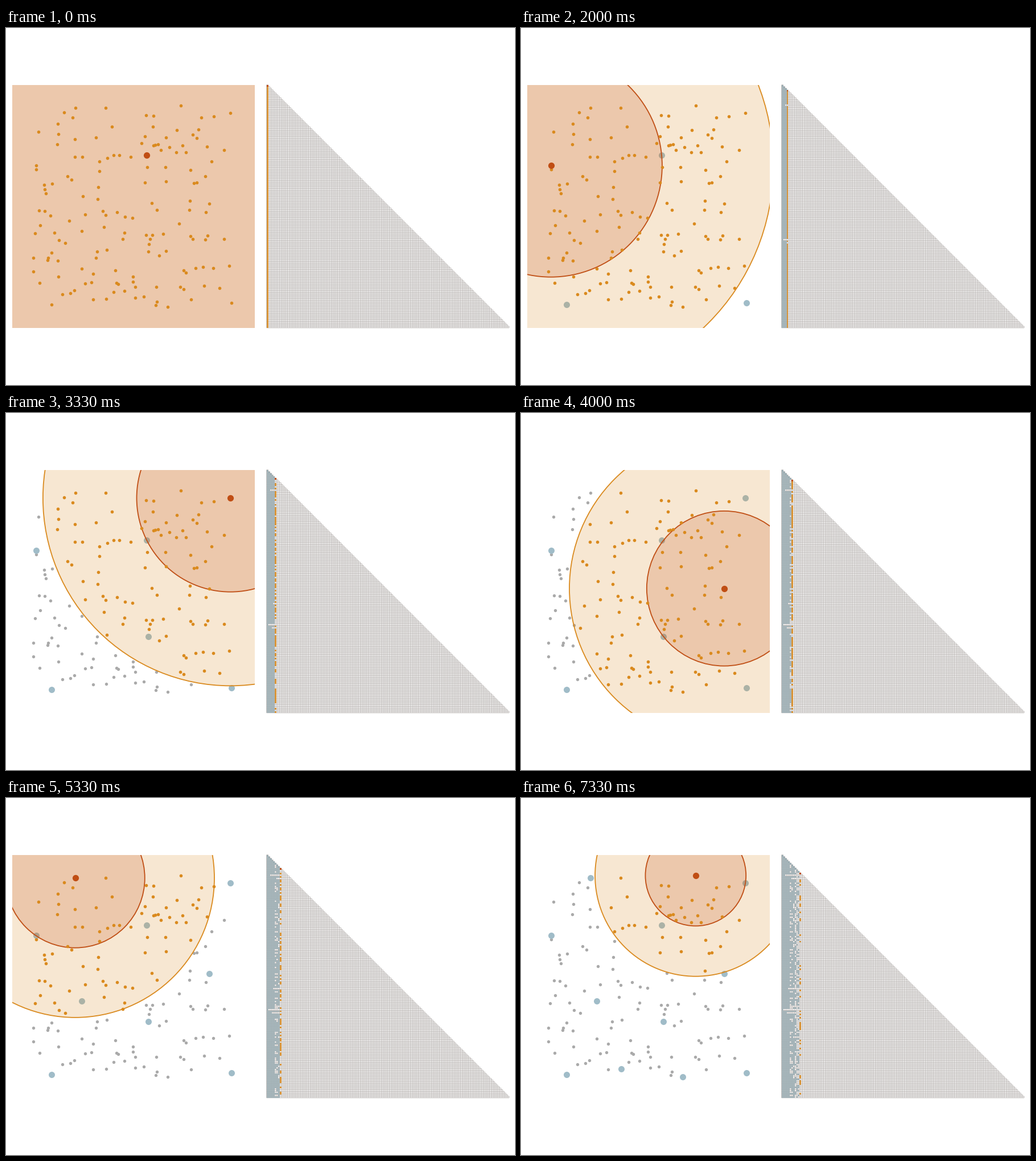
Animation of 894 by 626 pixels, one loop 8000 ms. Source, as a matplotlib script:

```python
import numpy as np
import matplotlib.pyplot as plt
from matplotlib.animation import FuncAnimation
from matplotlib.collections import LineCollection
from matplotlib.colors import to_rgba
from matplotlib.patches import Circle, Rectangle

W, H, DPI = 894, 626, 100
PX = 72 / DPI
INTERVAL, FRAMES, COUNT = 50, 160, 150
ORANGE, RED, BLUE, GREY = "#da8a1e", "#c04e14", "#a0bcc8", "#aaaaaa"
MESH, VISITED = "#aaa5a2", "#9caeb4"
SIDE, TOP, LEFT, GRID_X = 426, 99.8, 10.5, 457.7

# Centres in the order they are chosen; each is the farthest point left
HUBS = np.array([
    (247, 222.8), (80, 485.2), (395.5, 482), (52.5, 241.3), (250, 391.8),
    (394.2, 149), (356.7, 307.7), (133, 355.6), (121.5, 140.4),
    (284, 488.8), (176.2, 474.6), (306.8, 136)])
FIRST_ROWS = [0, 95, 12, 97]
STEPS = len(HUBS)
rng = np.random.default_rng(7)


def distances(points):
    """Distance of every centre (rows) to every point (columns)."""
    return np.linalg.norm(HUBS[:, None] - points, axis=2)


# Distance of each centre to the closest earlier one
apart = distances(HUBS)
radii = np.array([1000] + [apart[k, :k].min() for k in range(1, STEPS)])

# Scatter the other points where they would not be chosen any earlier
spread = rng.uniform((46, 139), (394, 490), (4 * COUNT, 2))
closest = np.minimum.accumulate(distances(spread), axis=0)
fits = (closest[:-1] <= radii[1:, None]).all(axis=0)
pts = np.vstack([HUBS, spread[fits]])[:COUNT]
index = np.arange(COUNT)
near = distances(pts) <= 2 * radii[:, None]

others = np.setdiff1d(index, FIRST_ROWS)
rows = np.concatenate([FIRST_ROWS, rng.permutation(others)])

fig = plt.figure(figsize=(W / DPI, H / DPI), dpi=DPI, facecolor="white")
ax = fig.add_axes([0, 0, 1, 1])
ax.axis("off")
panel = Rectangle((LEFT, TOP), SIDE, SIDE, transform=ax.transData)


def dots(radius, color, z):
    return ax.scatter([], [], s=(2 * radius * PX) ** 2, color=color,
                      linewidths=0, zorder=z)


def ring(color, z):
    c = Circle((0, 0), 1, facecolor=to_rgba(color, 0.2), edgecolor=color,
               linewidth=1.8 * PX, zorder=z)
    ax.add_patch(c)
    c.set_clip_path(panel)
    return c


idle = dots(2.7, GREY, 1)
old_hubs = dots(5.5, BLUE, 2)
outer, inner = ring(ORANGE, 3), ring(RED, 4)
active = dots(2.8, ORANGE, 5)
hub = dots(5.6, RED, 6)

# Triangular mesh, with the state of its cells painted on top
cell = SIDE / COUNT
lines = []
for i in range(COUNT + 1):
    start, end = max(i - 1, 0), min(i + 1, COUNT)
    lines.append([(0, i), (end, i)])
    lines.append([(i, start), (i, COUNT)])
mesh = np.array(lines) * cell + [GRID_X, TOP]
ax.add_collection(LineCollection(mesh, colors=MESH, linewidths=0.75 * PX,
                                 snap=False))
paint = ax.imshow(np.zeros((COUNT, COUNT, 4)), interpolation="nearest",
                  extent=(GRID_X, GRID_X + SIDE, TOP + SIDE, TOP),
                  aspect="auto", zorder=3)
ax.set(xlim=(0, W), ylim=(H, 0))


def waiting(step):
    return (index > step) | (index >= STEPS)


def cells(step):
    fill = np.zeros((COUNT, COUNT, 4))
    for k in range(step + 1):
        now = k == step
        hit = rows[near[k] & waiting(k)]
        fill[hit[hit > k], k] = to_rgba(ORANGE if now else VISITED, 0.85)
        fill[k, k] = to_rgba(RED if now else VISITED)
    return fill


def draw(frame):
    step = ((frame + 1) * STEPS - 1) // FRAMES
    r, left = radii[step], waiting(step)
    idle.set_offsets(pts[left & ~near[step]])
    active.set_offsets(pts[left & near[step]])
    old_hubs.set_offsets(HUBS[:step])
    hub.set_offsets(HUBS[step])
    for c, size in ((outer, 2 * r), (inner, r)):
        c.center = HUBS[step]
        c.set_radius(size)
    paint.set_data(cells(step))
    return idle, old_hubs, outer, inner, active, hub, paint


anim = FuncAnimation(fig, draw, frames=FRAMES, interval=INTERVAL,
                     repeat=True, repeat_delay=0)
plt.show()
```
